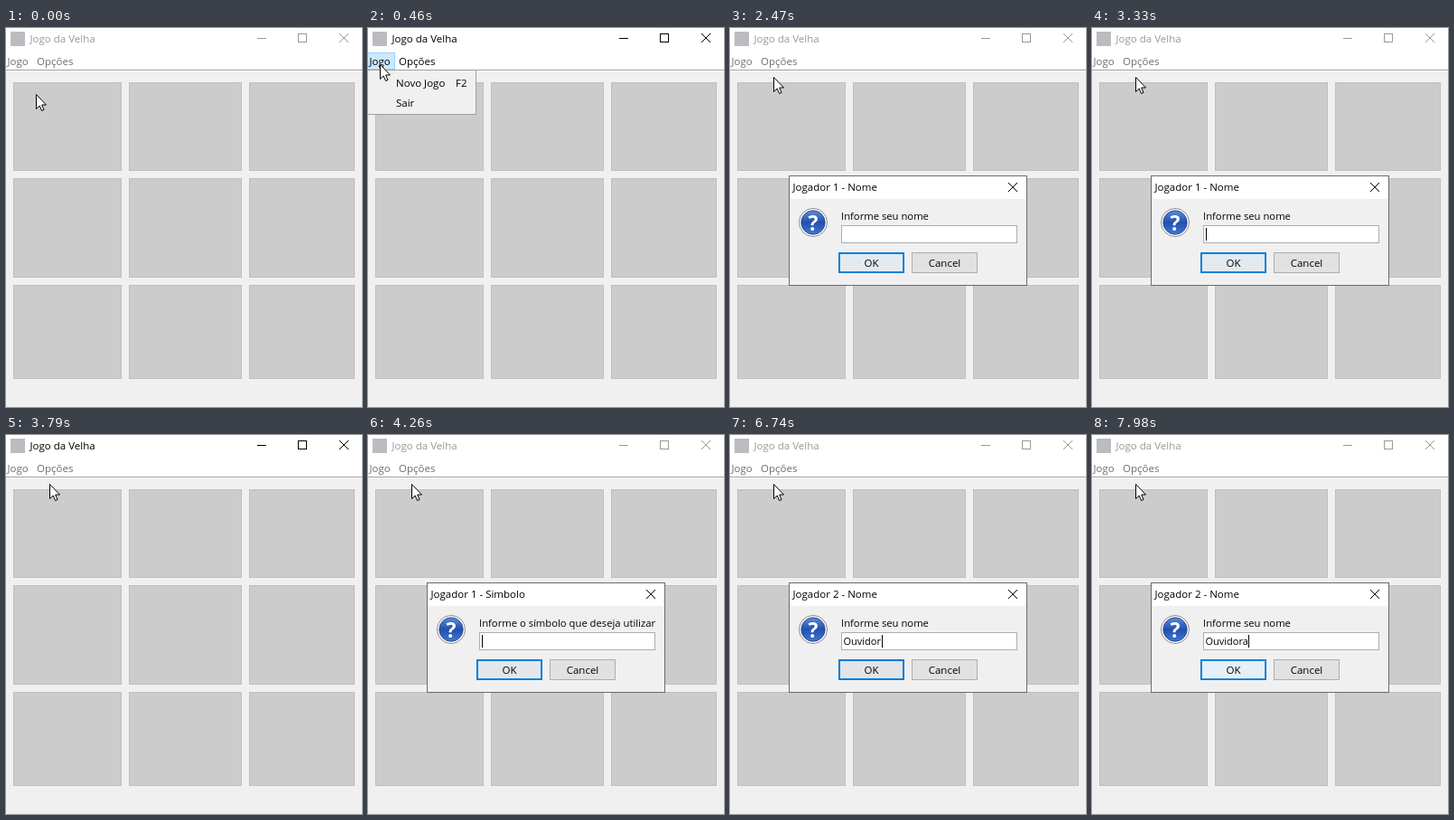
These frames come from a looping animation (394x419 px, 8000 ms). An HTML page:

```html
<!DOCTYPE html>
<html lang="pt">
<head>
<meta charset="utf-8">
<title>Jogo da Velha</title>
<style>
html, body { margin: 0; width: 100%; height: 100%; overflow: hidden; background: #f0f0f0; }
svg { display: block; width: 394px; height: 419px; }
text { font: 11.5px "Open Sans", "Noto Sans", sans-serif; white-space: pre; }
rect { shape-rendering: crispEdges; }
.label { font-size: 11.25px; }
.center { text-anchor: middle; }
#typed { font-size: 11px; }
#bar { --ink: #999; }
#bar.active { --ink: #000; }
#bar text { fill: var(--ink); }
#bar path { stroke: var(--ink); fill: none; }
#menus { fill: #6d6d6d; }
#menus.open { fill: #000; }
.cell { fill: #ccc; stroke: #bfbfbf; }
</style>
</head>
<body>
<svg viewBox="0 0 394 419">
  <defs>
    <linearGradient id="blue" x1="0" y1="0" x2="0" y2="1">
      <stop offset="0" stop-color="#5d8ad6"/>
      <stop offset=".5" stop-color="#2350ae"/>
      <stop offset="1" stop-color="#3f78d0"/>
    </linearGradient>
  </defs>
  <rect width="394" height="419" fill="#f0f0f0"/>
  <rect width="394" height="46" fill="#fff"/>
  <rect y="46" width="394" height="1" fill="#a0a0a0"/>
  <rect y="47" width="394" height="1" fill="#fff"/>

  <g id="bar">
    <rect x="5" y="4" width="16" height="16" fill="#bcbcc0"/>
    <text x="26.5" y="16">Jogo da Velha</text>
    <path d="M278 11.5h10M323.5 6.5h9v9h-9z" shape-rendering="crispEdges"/>
    <path d="M369 6l10 10M379 6l-10 10"/>
  </g>

  <g id="cells"></g>

  <g id="menus">
    <rect id="hot" x="-.5" y="27.5" width="30" height="18" fill="#cce8ff" stroke="#99d1ff"/>
    <text x="1.5" y="41">Jogo</text>
    <text x="34" y="41">Opções</text>
  </g>

  <g id="popup">
    <rect x="-1.5" y="46.5" width="121" height="49" fill="#f0f0f0" stroke="#a0a0a0"/>
    <rect id="pick" y="50" width="117" height="21" fill="#91c9f7"/>
    <text x="31" y="65">Novo Jogo</text>
    <text x="97" y="65">F2</text>
    <text x="31" y="87">Sair</text>
  </g>

  <g id="dialog">
    <rect x="65.5" y="163.5" width="263" height="121" fill="#f0f0f0" stroke="#6b6b6b"/>
    <rect x="66" y="164" width="262" height="25" fill="#fff"/>
    <text id="caption" x="69.5" y="180"></text>
    <path d="M308 171l10 10M318 171l-10 10" stroke="#000"/>
    <circle cx="92" cy="215" r="15.5" fill="#fff" stroke="#8b8b8b"/>
    <circle cx="92" cy="215" r="13.2" fill="url(#blue)" stroke="#1b3f8f" stroke-width=".8"/>
    <text class="center" x="92" y="223.5" fill="#fff" style="font-size:23px;font-weight:700">?</text>
    <text id="prompt" class="label" x="123" y="212"></text>
    <rect x="123.5" y="218.5" width="194" height="19" fill="#fff" stroke="#abadb3"/>
    <text id="typed" x="125.5" y="232"></text>
    <rect id="caret" x="126" y="221" width="1" height="14"/>
    <rect x="120.5" y="248.5" width="72" height="22" fill="#0078d7" stroke="#0078d7"/>
    <rect id="ok" x="121.5" y="249.5" width="70" height="20"/>
    <text class="center" x="156.5" y="264">OK</text>
    <rect x="201.5" y="248.5" width="72" height="22" fill="#e1e1e1" stroke="#adadad"/>
    <text class="center" x="237.5" y="264">Cancel</text>
  </g>

  <path id="cursor" d="M.5 .5V16.5L4.2 13 6.6 18.5 9 17.4 6.7 12H11.5Z" fill="#fff" stroke="#000"/>
</svg>
<script>
const LOOP = 8000, BLINK = 500, PULSE = 1000;
const $ = id => document.getElementById(id);
const show = (id, on) => $(id).style.display = on ? "" : "none";
const last = (list, t) => list.filter(s => s[0] <= t).pop();

const path = [[0, 33, 73], [70, 27, 62], [150, 19, 49], [220, 13, 40],
              [1320, 22, 43], [1400, 38, 50], [1490, 48, 54]];
const dialogs = [
  { from: 1870, to: 3790, title: "Jogador 1 - Nome", ask: "Informe seu nome" },
  { from: 3860, to: 4900, title: "Jogador 1 - Simbolo", ask: "Informe o símbolo que deseja utilizar" },
  { from: 4900, to: LOOP, title: "Jogador 2 - Nome", ask: "Informe seu nome",
    word: "Ouvidora", keys: [5590, 5750, 5900, 6060, 6210, 6370, 6520, 6750] }
];

for (const [x, w] of [[8, 120], [136, 125], [269, 117]])
  for (const [y, h] of [[60, 98], [166, 110], [284, 104]])
    $("cells").innerHTML +=
      `<rect class="cell" x="${x + .5}" y="${y + .5}" width="${w - 1}" height="${h - 1}"/>`;

const mix = (a, b, k) => `rgb(${a.map((v, i) => Math.round(v + (b[i] - v) * k))})`;

function drawDialog(d, t) {
  const age = t - d.from;
  const pressed = (d.keys || []).filter(k => k <= t);
  const since = pressed.length ? t - pressed[pressed.length - 1] : age;
  const wave = 1 - Math.abs(age / PULSE % 2 - 1);
  $("caption").textContent = d.title;
  $("prompt").textContent = d.ask;
  $("typed").textContent = (d.word || "").slice(0, pressed.length);
  const width = pressed.length ? $("typed").getComputedTextLength() : 0;
  $("caret").setAttribute("x", 126 + Math.round(width));
  show("caret", since % (2 * BLINK) < BLINK);
  $("ok").setAttribute("fill", mix([225, 225, 225], [229, 241, 251], wave));
  $("ok").setAttribute("stroke", mix([0, 120, 215], [40, 142, 222], wave));
}

function draw(t) {
  const [, x, y] = last(path, t);
  const d = dialogs.find(d => t >= d.from && t < d.to);
  const open = t >= 390 && t < 1790;
  $("cursor").setAttribute("transform", `translate(${x} ${y})`);
  $("bar").classList.toggle("active", t >= 390 && !d);
  $("menus").classList.toggle("open", open);
  show("hot", open);
  show("popup", open && t >= 460);
  show("pick", t >= 1400);
  show("dialog", d);
  if (d) drawDialog(d, t);
}

const start = performance.now();
function tick(now) {
  draw(Math.max(0, now - start) % LOOP);
  requestAnimationFrame(tick);
}
draw(0);
requestAnimationFrame(tick);
</script>
</body>
</html>
```
